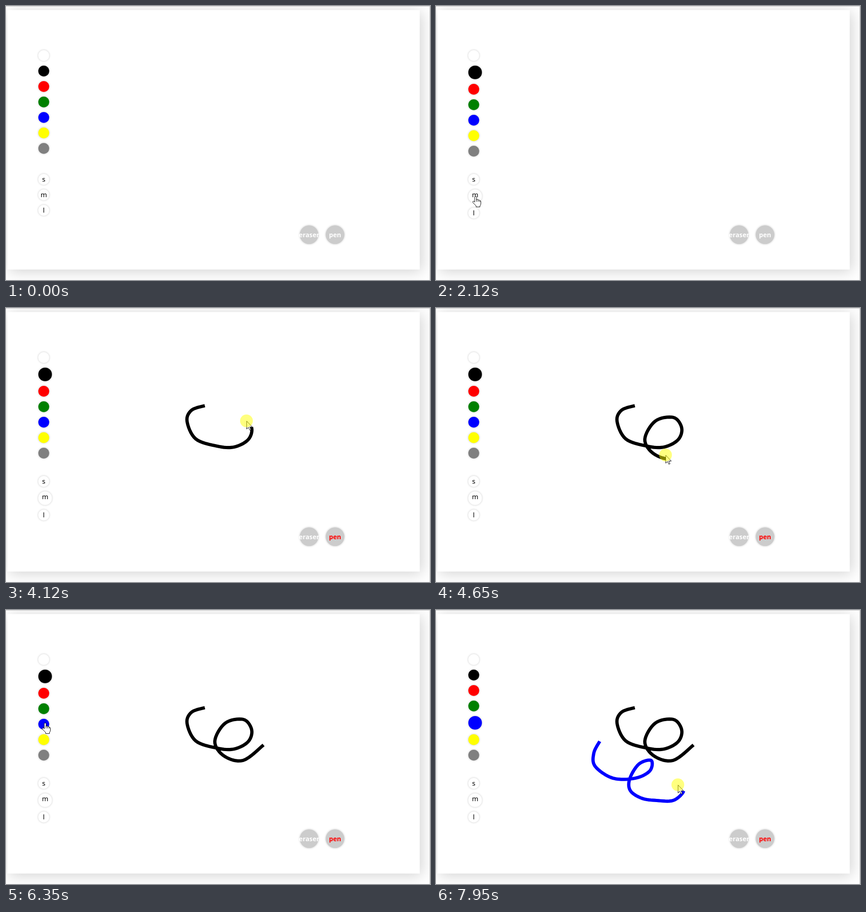
An HTML page with a canvas for the animation above (8 s loop, 931 by 602 pixels).

```html
<!DOCTYPE html>
<html lang="en">
<head>
<meta charset="utf-8">
<title>Drawing board</title>
<style>
  html, body { margin: 0; width: 100%; height: 100%; overflow: hidden; background: #fff; }
  canvas { display: block; }
</style>
</head>
<body>
<canvas id="stage" width="931" height="602"></canvas>
<script>
const ctx = document.getElementById('stage').getContext('2d');
const LOOP = 8000;
const TICK = 76.7;
const PRESS = 75;
const FONT = '"Noto Sans", "Open Sans", sans-serif';
const COLORS = ['white', 'black', 'red', 'green', 'blue', 'yellow', 'gray'];
const SIZES = ['s', 'm', 'l'];
const CLICK = { black: 1430, m: 2040, pen: 2650, blue: 6410 };

// Pointer moves, eased from wherever it rests.
const ENTRY = [792, 579];
const MOVES = [
  { from: 480, to: 1030, at: [61, 148] },
  { from: 1210, to: 1350, at: [77, 138] },
  { from: 1590, to: 1970, at: [87, 418] },
  { from: 2116, to: 2570, at: [734, 506] },
  { from: 2805, to: 3110, at: [427, 206] },
  { from: 4835, to: 4950, at: [556, 289] },
  { from: 5110, to: 5340, at: [384, 343] },
  { from: 5345, to: 5880, at: [46, 246] },
  { from: 5950, to: 6335, at: [86, 248] },
  { from: 6490, to: 6720, at: [348, 279] }
];

const STROKES = [
  {
    color: '#000', from: 3370, to: 4835,
    path: smooth([
      [436, 214], [407, 224], [397, 248], [416, 287], [463, 303], [500, 305], [531, 289],
      [539, 263], [521, 240], [481, 248], [458, 288], [478, 320], [520, 330], [565, 296]
    ])
  },
  {
    color: '#00f', from: 6950, to: 7960,
    path: smooth([
      [359, 288], [346, 314], [349, 343], [388, 369], [437, 369], [469, 353], [472, 330],
      [445, 338], [425, 370], [426, 396], [451, 413], [484, 418], [520, 418], [542, 400], [537, 389]
    ])
  }
];

const ARROW = new Path2D('M.5 .5V18L4.4 14.3L7.2 20.3L9.8 19.2L7.1 13.3H12.6Z');
const HAND = new Path2D(
  'M-2 13V2Q-2 0 0 0Q2 0 2 2V8Q2.2 6.6 4 6.8Q5.5 7 5.5 8.6Q6 7.6 7.5 8Q9 8.3 9 9.8' +
  'Q11.5 9.3 11.5 12V16Q11.5 19 9.5 21V23.5H1V21L-5 14.8Q-7.6 11.6 -5 10.8Q-3.5 10.5 -2 13Z');
const FINGERS = new Path2D('M2 7V12M5.5 8.5V12M9 9.5V12.5');

function mix(a, b, f) { return a.map((v, i) => v + (b[i] - v) * f); }
function gap(a, b) { return Math.hypot(b[0] - a[0], b[1] - a[1]); }
function clamp(f) { return Math.max(0, Math.min(1, f)); }
function ease(f) { return f * f * (3 - 2 * f); }
function progress(span, t) { return clamp((t - span.from) / (span.to - span.from)); }

// Catmull-Rom curve through the points, as a fine polyline.
function smooth(points, parts = 8) {
  const at = i => points[Math.max(0, Math.min(points.length - 1, i))];
  const out = [];
  for (let i = 0; i < points.length - 1; i++) {
    for (let k = 0; k < parts; k++) {
      const f = k / parts;
      out.push(at(i).map((p, axis) => {
        const [a, b, c] = [at(i - 1), at(i + 1), at(i + 2)].map(q => q[axis]);
        return p + f / 2 * (b - a + f * (2 * a - 5 * p + 4 * b - c + f * (3 * (p - b) + c - a)));
      }));
    }
  }
  return [...out, points[points.length - 1]];
}

// The leading part of a polyline, by share of its length and a setback in pixels.
function leading(path, share, setback = 0) {
  const total = path.slice(1).reduce((sum, p, i) => sum + gap(path[i], p), 0);
  let left = Math.max(0, total * share - setback);
  const out = [path[0]];
  for (let i = 1; i < path.length && left > 0; i++) {
    const d = gap(path[i - 1], path[i]);
    out.push(mix(path[i - 1], path[i], Math.min(1, left / d)));
    left -= d;
  }
  return out;
}

function disc(x, y, r, color) {
  ctx.fillStyle = color;
  ctx.beginPath();
  ctx.arc(x, y, r, 0, Math.PI * 2);
  ctx.fill();
}

function shadowed(color, blur, offset, draw) {
  ctx.save();
  ctx.shadowColor = color;
  ctx.shadowBlur = blur;
  ctx.shadowOffsetX = ctx.shadowOffsetY = offset;
  draw();
  ctx.restore();
}

function button({ x, y, r }, color) {
  shadowed('rgba(0,0,0,.22)', 4, 0, () => disc(x, y, r, color));
}

function label(text, x, y, font, color) {
  ctx.font = `${font} ${FONT}`;
  ctx.textAlign = 'center';
  ctx.fillStyle = color;
  ctx.fillText(text, x, y);
}

// Stacks round buttons; the selected one is larger and pushes the rest down.
function layout(items, top, selected) {
  const chosen = items.indexOf(selected);
  return items.map((name, i) => {
    const r = i === chosen ? 14.9 : 11.9;
    const y = top + 34 * i + (chosen >= 0 && i > chosen ? 6 : 0);
    return { name, r, x: 71 + r, y: y + r, top: y };
  });
}

function drawPanel() {
  ctx.fillStyle = '#fff';
  ctx.fillRect(0, 0, 931, 602);
  shadowed('rgba(0,0,0,.18)', 30, 4, () => ctx.fillRect(3, 9, 905.5, 570));
  ctx.fillStyle = '#c4c4c4';
  ctx.fillRect(0, 0, 931, 1);
  ctx.fillRect(930, 0, 1, 602);
}

function drawStroke(stroke, t) {
  if (t <= stroke.from) return;
  ctx.save();
  ctx.translate(.5, .5);
  ctx.beginPath();
  for (const p of leading(stroke.path, progress(stroke, t), t < stroke.to ? 6 : 0)) ctx.lineTo(...p);
  ctx.strokeStyle = stroke.color;
  ctx.lineWidth = 7.2;
  ctx.lineJoin = 'round';
  ctx.stroke();
  ctx.restore();
}

function pointerAt(t) {
  const active = STROKES.find(s => t >= s.from && t < s.to);
  if (active) {
    const [x, y] = leading(active.path, progress(active, t)).pop();
    return [x - 9, y - 8];
  }
  return MOVES.reduce((p, move) => mix(p, move.at, ease(progress(move, t))), ENTRY);
}

function drawPointer(x, y, overButton, pressed) {
  ctx.save();
  ctx.translate(Math.round(x), Math.round(y));
  ctx.fillStyle = '#fff';
  ctx.strokeStyle = '#000';
  ctx.lineWidth = 1;
  const shape = overButton ? HAND : ARROW;
  ctx.fill(shape);
  ctx.stroke(shape);
  if (overButton) ctx.stroke(FINGERS);
  if (pressed) disc(0, 0, 14, 'rgba(255,255,0,.5)');
  ctx.restore();
}

function draw(t) {
  const done = name => t >= CLICK[name] + PRESS + 5;
  const swatches = layout(COLORS, 97, done('blue') ? 'blue' : done('black') && 'black');
  const sizes = layout(SIZES, 369, done('m') && 'm');
  const tools = ['eraser', 'pen'].map((name, i) => ({ name, x: 665.5 + 57 * i, y: 502.5, r: 20.5 }));

  drawPanel();
  for (const b of swatches) button(b, b.name);
  for (const b of sizes) {
    button(b, '#fff');
    label(b.name, b.x, b.top + 16.5, '15px', '#000');
  }
  for (const b of tools) {
    button(b, '#ccc');
    label(b.name, b.x, 507.5, 'bold 14.2px', done(b.name) ? '#f00' : '#fff');
  }
  for (const s of STROKES) drawStroke(s, t);

  if (t < MOVES[0].from) return;
  const [x, y] = pointerAt(t);
  const over = [...swatches, ...sizes, ...tools].some(b => gap([x, y], [b.x, b.y]) < b.r);
  const clicking = Object.values(CLICK).some(c => t >= c && t < c + PRESS);
  const drawing = STROKES.some(s => t >= s.from && t < s.to);
  drawPointer(x, y, over, clicking || drawing);
}

// The screen refreshes in steps of one tick.
function frame(now) {
  const t = now % LOOP;
  draw(50 + TICK * Math.floor((t - 35) / TICK));
  requestAnimationFrame(frame);
}
requestAnimationFrame(frame);
</script>
</body>
</html>
```
